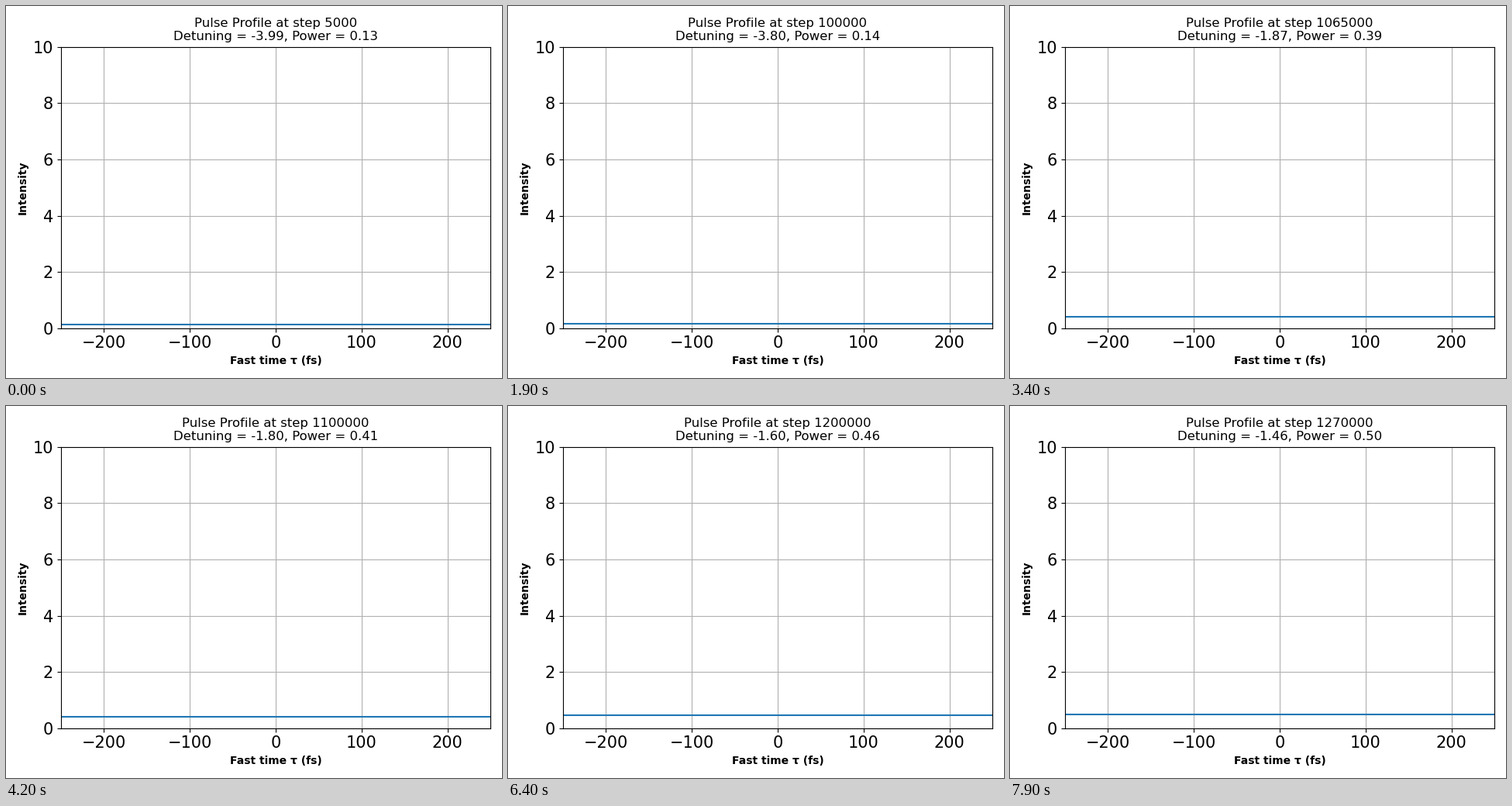
Write a matplotlib script that moves like this. It is 640 px wide and 480 px high and loops after 8000 ms.

```python
import numpy as np
import matplotlib.pyplot as plt
from matplotlib.animation import FuncAnimation

FRAMES = 80
INTERVAL = 100  # ms
PUMP = 2.4      # normalised pump power
STRIDE = 5000
TITLE_SIZE = 11.87  # just under 12 pt, so hinting rounds glyph heights down

# Steps play in the text order of their six-digit zero-padded names,
# so 105000 falls between 1045000 and 1050000.
steps = sorted(range(STRIDE, 1_300_000, STRIDE), key=lambda s: f"{s:06d}")


def detuning(step):
    return -4 + 2e-6 * step


def steady_power(delta):
    """Real root of P * (1 + (P - delta)**2) = PUMP."""
    roots = np.roots([1, -2 * delta, 1 + delta**2, -PUMP])
    return roots[np.argmin(abs(roots.imag))].real


plt.rcParams["font.family"] = "DejaVu Sans"
fig, ax = plt.subplots(figsize=(6.4, 4.8), dpi=100)
tau = np.linspace(-250, 250, 512)
line, = ax.plot(tau, np.zeros_like(tau))
ax.set_xlim(-250, 250)
ax.set_ylim(0, 10)
ax.set_xlabel("Fast time τ (fs)", fontsize=10, fontweight="bold")
ax.set_ylabel("Intensity", fontsize=10, fontweight="bold")
ax.tick_params(labelsize=15)
ax.grid(True)


def update(i):
    step = steps[i]
    delta = detuning(step)
    power = steady_power(delta)
    line.set_ydata(np.full_like(tau, power))
    ax.set_title(f"Pulse Profile at step {step}\n"
                 f"Detuning = {delta:.2f}, Power = {power:.2f}",
                 fontsize=TITLE_SIZE)
    return line, ax.title


update(0)
fig.tight_layout()
anim = FuncAnimation(fig, update, frames=FRAMES, interval=INTERVAL,
                     repeat=True, repeat_delay=0, blit=False)
plt.show()
```
